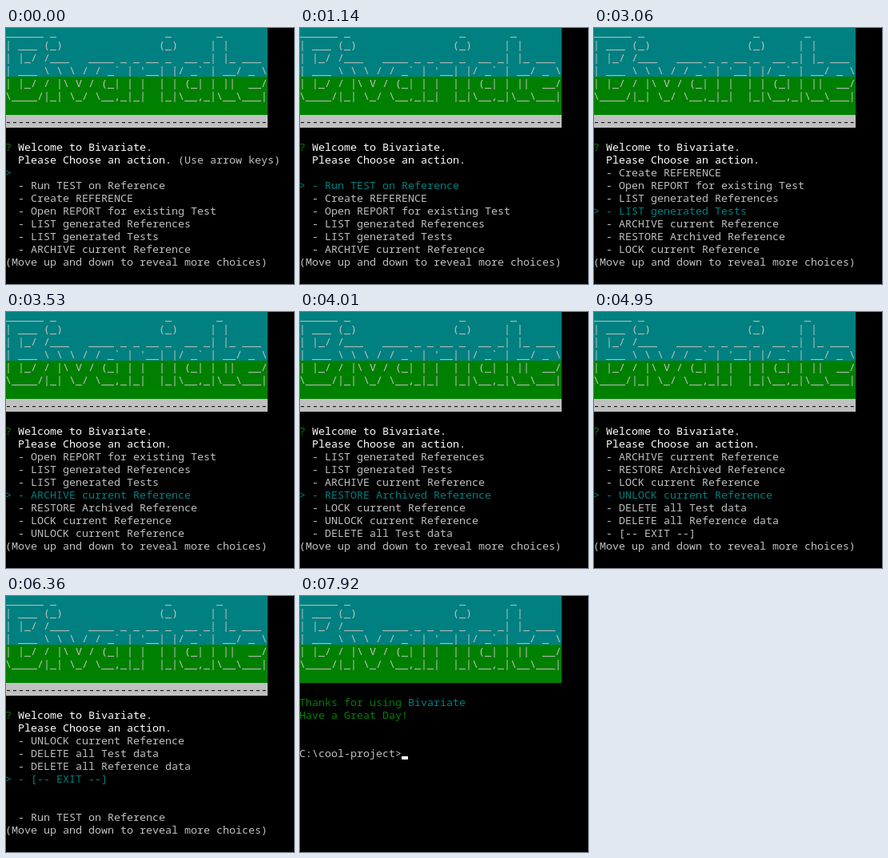
These frames come from a looping animation (360x321 px, 8 s). An HTML page with a canvas:

```html
<!DOCTYPE html>
<html lang="en">
<head>
<meta charset="utf-8">
<title>Bivariate menu</title>
<style>
  html, body { margin: 0; width: 100%; height: 100%; overflow: hidden; background: #000; }
  canvas { display: block; }
</style>
</head>
<body>
<canvas id="screen" width="360" height="321"></canvas>
<script>
const ctx = document.getElementById('screen').getContext('2d', { alpha: false });

const LOOP = 8000;
const EXIT_AT = 7920;
const CELL_W = 8, CELL_H = 16, LEFT = -1, TOP = -3, BASELINE = 13;
const COLUMNS = 41, PAGE = 7, POINTER_ROW = 3;
const GREY = '#c0c0c0', WHITE = '#fff', TEAL = '#008080', GREEN = '#008000';

const BANNER = [
  "______ _                 _       _",
  "| ___ (_)               (_)     | |",
  "| |_/ /___   ____ _ _ __ _  __ _| |_ ___",
  "| ___ \\ \\ \\ / / _` | '__| |/ _` | __/ _ \\",
  "| |_/ / |\\ V / (_| | |  | | (_| | ||  __/",
  "\\____/|_| \\_/ \\__,_|_|  |_|\\__,_|\\__\\___|"
];

const CHOICES = [
  '',
  '- Run TEST on Reference',
  '- Create REFERENCE',
  '- Open REPORT for existing Test',
  '- LIST generated References',
  '- LIST generated Tests',
  '- ARCHIVE current Reference',
  '- RESTORE Archived Reference',
  '- LOCK current Reference',
  '- UNLOCK current Reference',
  '- DELETE all Test data',
  '- DELETE all Reference data',
  '- [-- EXIT --]',
  ''
];

// Each key press moves the pointer down one choice.
const PRESSES = [1140, 1690, 2140, 2600, 3060, 3530, 4010, 4490, 4950, 5400, 5810, 6360];

const colX = col => LEFT + col * CELL_W;
const rowY = row => TOP + row * CELL_H;

function print(text, col, row, color) {
  ctx.fillStyle = color;
  ctx.fillText(text, colX(col), rowY(row) + BASELINE);
}

function band(row, count, color) {
  ctx.fillStyle = color;
  ctx.fillRect(LEFT, rowY(row), COLUMNS * CELL_W, count * CELL_H);
}

function drawBanner() {
  band(0, 4, TEAL);
  band(4, 3, GREEN);
  BANNER.forEach((line, row) => print(line, 0, row, GREY));
}

function drawMenu(selected) {
  band(7, 1, GREY);
  print('-'.repeat(COLUMNS), 0, 7, '#000');

  print('?', 0, 9, GREEN);
  print('Welcome to Bivariate.', 2, 9, WHITE);
  print('Please Choose an action.', 2, 10, WHITE);
  if (selected === 0) print('(Use arrow keys)', 27, 10, GREY);

  const first = Math.max(0, selected - POINTER_ROW);
  for (let i = 0; i < PAGE; i++) {
    const index = (first + i) % CHOICES.length;
    const active = index === selected;
    if (active) print('>', 0, 11 + i, TEAL);
    print(CHOICES[index], 2, 11 + i, active ? TEAL : GREY);
  }
  print('(Move up and down to reveal more choices)', 0, 18, GREY);
}

function drawGoodbye() {
  print('Thanks for using', 0, 8, GREEN);
  print('Bivariate', 17, 8, TEAL);
  print('Have a Great Day!', 0, 9, GREEN);

  const prompt = 'C:\\cool-project>';
  print(prompt, 0, 12, GREY);
  ctx.fillStyle = WHITE;
  ctx.fillRect(colX(prompt.length), rowY(13) - 4, CELL_W, 4);
}

function draw(t) {
  ctx.fillStyle = '#000';
  ctx.fillRect(0, 0, 360, 321);
  ctx.font = '13.333px "Noto Sans Mono", "DejaVu Sans Mono", monospace';
  ctx.textBaseline = 'alphabetic';
  drawBanner();
  if (t < EXIT_AT) drawMenu(PRESSES.filter(at => t >= at).length);
  else drawGoodbye();
}

const start = performance.now();
function tick() {
  draw((performance.now() - start) % LOOP);
  requestAnimationFrame(tick);
}
tick();
</script>
</body>
</html>
```
